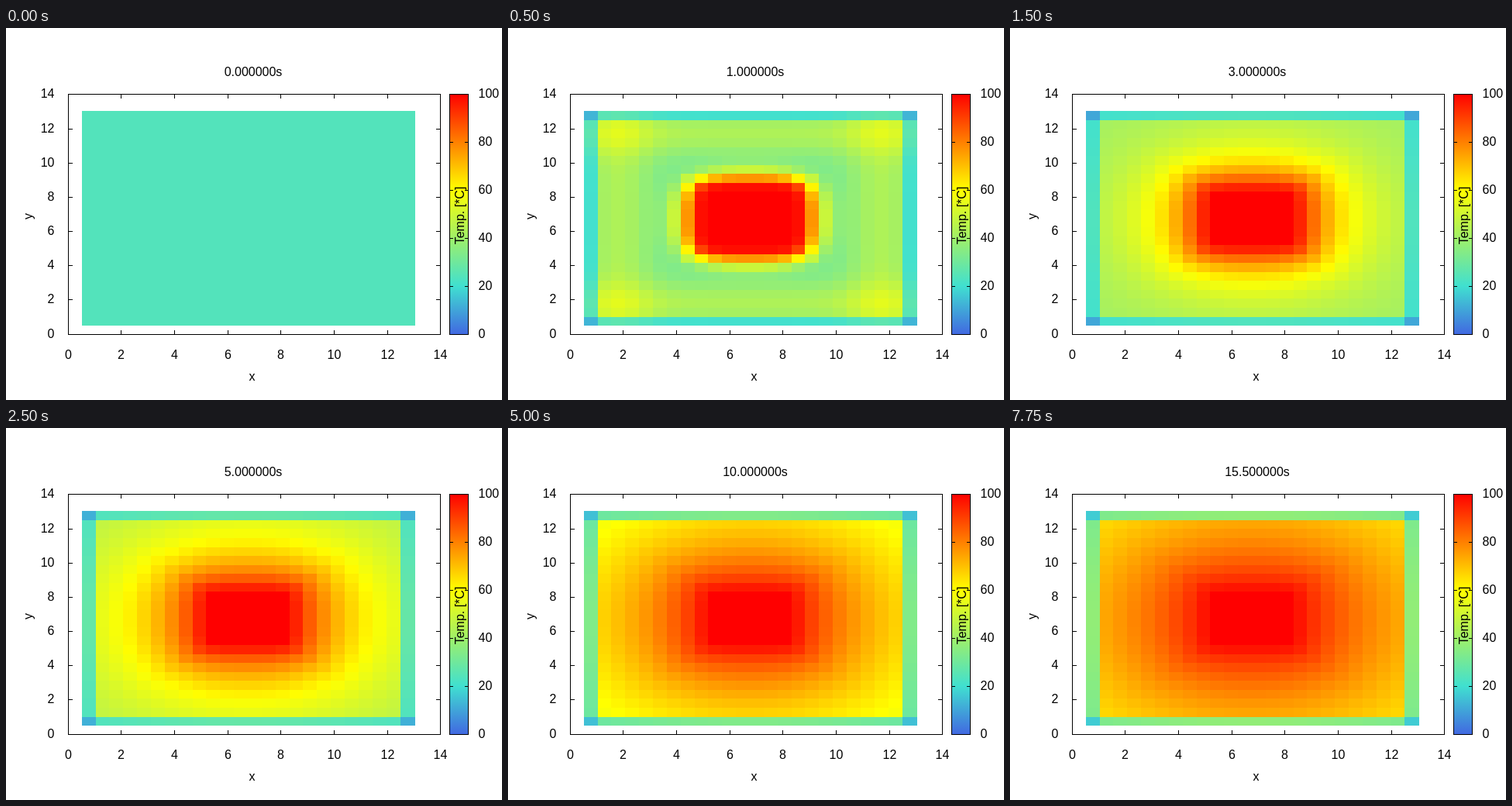
Animation of 640x480 px, one loop 8 s. Source, as an HTML page with a canvas:

```html
<!DOCTYPE html>
<html lang="en">
<head>
<meta charset="utf-8">
<title>Heat map</title>
<style>
html, body { margin: 0; width: 100%; height: 100%; overflow: hidden; background: #fff; }
canvas { display: block; }
</style>
</head>
<body>
<canvas id="stage" width="640" height="480"></canvas>
<script>
const ctx = document.getElementById('stage').getContext('2d');
const CELLS = 24, STEP_MS = 250, STEPS = 32, START_TEMP = 24;
const STOPS = [
  { temp: 0, rgb: [65, 105, 225] },
  { temp: 20, rgb: [64, 224, 208] },
  { temp: 60, rgb: [255, 255, 0] },
  { temp: 100, rgb: [255, 0, 0] }
];

function color(temp) {
  const i = Math.max(1, STOPS.findIndex(s => s.temp >= temp));
  const a = STOPS[i - 1], b = STOPS[i];
  const k = (temp - a.temp) / (b.temp - a.temp);
  return `rgb(${a.rgb.map((v, c) => Math.round(v + (b.rgb[c] - v) * k))})`;
}

// Distance from the centre: contours are square near the core, round further out
function radius(x, y) {
  const n = 2 + 2 * (4 / Math.max(x, y)) ** 3;
  return (x ** n + y ** n) ** (1 / n);
}

const wallHeat = m => Math.exp(-(((m - 1) / 2.4) ** 2));

function cellTemp(t, i, j) {
  if (t === 0) return START_TEMP;
  const ax = Math.abs(i - 11.5), ay = Math.abs(j - 11.5);
  const x = Math.min(ax, 10.5), y = Math.min(ay, 10.5);
  const start = Math.exp(-t * t / 1.5);

  // Heat spreads from the core; its front grows wider and softer
  const away = Math.max(0, radius(x, y) - 3);
  const reach = 1.3 + 0.85 * t, sharpness = 0.85 + 1.55 / t ** 1.5;
  const drop = (60 + 16 * start) * (1 - Math.exp(-((away / reach) ** sharpness)));

  // A short pulse of heat enters from the walls
  const pulse = 22 * start * (wallHeat(10.5 - x) + wallHeat(10.5 - y));

  // Rim cells average the inside with a zero border
  const rim = (ax > 11) + (ay > 11);
  return Math.min(100, 100 - drop + pulse) * 0.5 ** rim;
}

const cellX = i => Math.round(97.65 + 17.865 * i);
const cellY = j => Math.round(107.4 + 11.527 * j);

function drawMap(t) {
  for (let j = 0; j < CELLS; j++) {
    for (let i = 0; i < CELLS; i++) {
      ctx.fillStyle = color(cellTemp(t, i, j));
      ctx.fillRect(cellX(i), cellY(j), cellX(i + 1) - cellX(i) + 2, cellY(j + 1) - cellY(j));
    }
  }
}

function text(str, x, y, align = 'center', turned = false) {
  ctx.save();
  ctx.translate(x, y);
  if (turned) ctx.rotate(-Math.PI / 2);
  ctx.textAlign = align;
  ctx.fillText(str, 0, 0);
  ctx.restore();
}

const hLine = (x, y, w) => ctx.fillRect(x, y, w, 1);
const vLine = (x, y, h) => ctx.fillRect(x, y, 1, h);

function drawAxes() {
  ctx.fillStyle = '#000';
  ctx.strokeRect(80.5, 85.5, 480, 310);
  for (let v = 0; v <= 14; v += 2) {
    const x = Math.floor(80 + v * 34.34), y = Math.floor(395 - v * 22.08);
    vLine(x, 85, 6);
    vLine(x, 390, 6);
    hLine(80, y, 6);
    hLine(555, y, 6);
    text(v, x + 0.5, 427);
    text(v, 62.5, y + 5, 'right');
  }
  text('x', 317.5, 455);
  text('y', 34, 243, 'center', true);
}

function drawScale() {
  const gradient = ctx.createLinearGradient(0, 395, 0, 85);
  for (const { temp } of STOPS) gradient.addColorStop(temp / 100, color(temp));
  ctx.fillStyle = gradient;
  ctx.fillRect(572, 85, 24, 310);
  ctx.fillStyle = '#000';
  ctx.strokeRect(572.5, 85.5, 24, 310);
  for (let v = 0; v <= 100; v += 20) {
    const y = 395 - v * 3.1;
    hLine(572, y, 5);
    hLine(592, y, 5);
    text(v, 609.5, y + 5, 'left');
  }
  text('Temp. [*C]', 591, 242, 'center', true);
}

function draw(now) {
  const t = Math.floor(now / STEP_MS) % STEPS / 2;
  ctx.fillStyle = '#fff';
  ctx.fillRect(0, 0, 640, 480);
  ctx.font = '16px "Liberation Sans", Arial, sans-serif';
  drawMap(t);
  drawAxes();
  drawScale();
  text(t.toFixed(6) + 's', 319, 62);
}

function loop() {
  draw(performance.now());
  requestAnimationFrame(loop);
}
loop();
</script>
</body>
</html>
```
